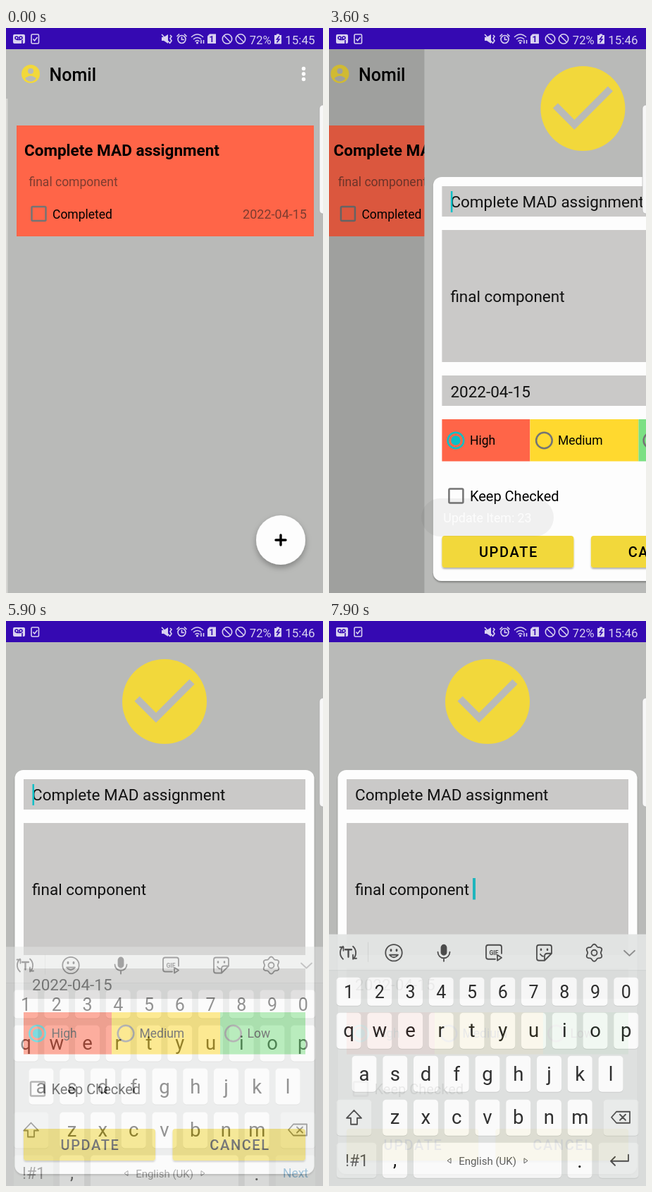
Write an HTML page that moves like this. It is 450 px wide and 800 px high and loops after 8 s.

```html
<!DOCTYPE html>
<html lang="en">
<head>
<meta charset="utf-8">
<title>To-do app</title>
<style>
  html, body { margin: 0; width: 100%; height: 100%; overflow: hidden; background: #b9bab8; }
  svg { display: block; width: 100%; height: 100%; font-family: Roboto, sans-serif; }
  .line { fill: none; stroke: #444; stroke-width: 1.8; stroke-linecap: round; stroke-linejoin: round; }
  .status { fill: none; stroke: #d9d2f0; stroke-width: 1.6; }
  .status .solid { fill: #d9d2f0; stroke: none; }
  .box { fill: none; stroke: #747474; stroke-width: 2.5; }
  .mid { text-anchor: middle; }
  .button { font-size: 20px; font-weight: 500; letter-spacing: 1.6px; text-anchor: middle; }
</style>
</head>
<body>
<svg viewBox="0 0 450 800">
  <defs>
    <filter id="shadow" x="-20%" y="-20%" width="140%" height="150%">
      <feDropShadow dx="0" dy="4" stdDeviation="4" flood-opacity=".3"/>
    </filter>
    <filter id="soft" x="-10%" y="-10%" width="120%" height="140%">
      <feDropShadow dx="0" dy="2" stdDeviation="1.3" flood-opacity=".3"/>
    </filter>
    <clipPath id="formClip"><rect id="formWindow" x="12" y="224" width="426"/></clipPath>
  </defs>

  <g id="home">
    <rect width="450" height="800" fill="#b9bab8"/>
    <rect y="100" width="2.5" height="700" fill="#d6d5d2"/>
    <circle cx="35" cy="65" r="13" fill="#f2d83b"/>
    <circle cx="35" cy="61" r="4" fill="#b9bab8"/>
    <path d="M27 71.500Q35 64 43 71.500Q35 80 27 71.500" fill="#b9bab8"/>
    <text x="61.500" y="74.500" font-size="25" font-weight="500">Nomil</text>
    <g fill="#fff"><circle cx="422.500" cy="57.500" r="2.700"/><circle cx="422.500" cy="65" r="2.700"/><circle cx="422.500" cy="72.500" r="2.700"/></g>
    <rect x="15" y="138" width="422" height="157" fill="#ff6548"/>
    <text x="26" y="181" font-size="22.500" font-weight="700">Complete MAD assignment</text>
    <g font-size="17.500">
      <text x="32.500" y="224" fill="#7e3c30">final component</text>
      <text x="66" y="269.500">Completed</text>
      <text x="427" y="269.500" font-size="18" text-anchor="end" fill="#7e3c30">2022-04-15</text>
    </g>
    <rect class="box" x="36.500" y="253" width="20" height="20" rx="1.500"/>
    <circle cx="390" cy="725" r="35" fill="#fdfdfd" filter="url(#shadow)"/>
    <path d="M390 718V732M383 725H397" stroke="#000" stroke-width="3.400" stroke-linecap="round"/>
    <rect id="dim" width="450" height="800"/>
  </g>

  <g id="edit">
    <rect width="450" height="800" fill="#b9bab8"/>
    <rect id="below" y="436" width="450" height="364" fill="#fbfbfb"/>
    <circle cx="225" cy="114" r="60" fill="#f2d83b"/>
    <path d="M186 110L213 137L264 86" fill="none" stroke="#b9bab8" stroke-width="10"/>
    <rect id="card" x="12.500" y="211" width="425" rx="12" fill="#fdfdfd" filter="url(#soft)"/>
    <g clip-path="url(#formClip)">
      <g id="form">
        <g fill="#cac9c8">
          <rect x="25" y="224" width="400" height="43"/>
          <rect x="25" y="286" width="400" height="187"/>
          <rect x="25" y="492" width="400" height="43"/>
        </g>
        <g font-size="22.500" fill="#111">
          <text x="37" y="254">Complete MAD assignment</text>
          <text x="37" y="388">final component</text>
          <text x="37" y="522.500">2022-04-15</text>
        </g>
        <rect id="titleCursor" x="37.500" y="231" width="2.500" height="30" fill="#0abfc6"/>
        <rect id="notesCursor" x="204" y="364" width="4" height="30.500" fill="#1fb5bd"/>
        <path id="handle" d="M205 394.500L213.300 402.700A11.700 11.700 0 1 1 196.700 402.700Z" fill="#0abfc6"/>
        <rect x="25" y="554" width="125" height="59.500" fill="#ff6548"/>
        <rect x="150" y="554" width="154" height="59.500" fill="#ffd92f"/>
        <rect x="304" y="554" width="121" height="59.500" fill="#7be083"/>
        <circle class="box" cx="44.500" cy="584" r="11.300" style="stroke:#0abfc6"/>
        <circle cx="44.500" cy="584" r="6.700" fill="#0abfc6"/>
        <circle class="box" cx="170" cy="584" r="11.300"/>
        <circle class="box" cx="322.500" cy="584" r="11.300"/>
        <g font-size="17.500"><text x="64.500" y="590">High</text><text x="189.500" y="590">Medium</text><text x="342.500" y="590">Low</text></g>
        <rect class="box" x="35" y="652.500" width="20" height="20" rx="1.500"/>
        <text x="64.500" y="670" font-size="20">Keep Checked</text>
        <g fill="#f2d83b" filter="url(#soft)"><rect x="25" y="719" width="187" height="45" rx="4"/><rect x="236.500" y="719" width="188.500" height="45" rx="4"/></g>
        <text class="button" x="119.500" y="749">UPDATE</text>
        <text class="button" x="332" y="749">CANCEL</text>
      </g>
    </g>
  </g>

  <g id="keyboard">
    <rect y="436" width="450" height="420" fill="#dcdedd"/>
    <rect y="436" width="450" height="51" fill="#e3e5e4"/>
    <path d="M0 487H450M55.500 447V475" stroke="#d0d2d1"/>
    <g id="keys"></g>
    <g class="line">
      <path d="M20 471A12 12 0 0 1 20 453M15.500 454H20.500V459M34 453A12 12 0 0 1 34 471M39 470H34V465"/>
      <path d="M23 457.500H32M27.500 457.500V468" stroke-width="2.300"/>
      <circle cx="92" cy="462" r="11.700"/><path d="M86 465Q92 472 98 465Z"/>
      <path d="M88 458V459M96 458V459" stroke-width="2.800"/>
      <rect x="159.500" y="451" width="7" height="14" rx="3.500" fill="#444"/><path d="M154.500 461A8.500 8.500 0 0 0 171.500 461M163 470V474"/>
      <path d="M236 471H226Q223 471 223 468V454Q223 451 226 451H242Q245 451 245 454V463M239 465L245 469L239 473Z"/>
      <path d="M306 473H298Q295 473 295 470V454Q295 451 298 451H313Q316 451 316 454V463L306 473V467Q306 463 310 463H316M300 464Q302 467 304 467"/>
      <path d="M301 457V458M310 457V458" stroke-width="2.500"/>
      <path id="gear"/><circle cx="376.500" cy="462" r="4"/>
      <path d="M419 459L426.500 466L434 459" stroke="#888"/>
      <path d="M35.500 685L46 696H40V705H31V696H25Z"/>
      <path d="M401 695L408 687H427V703H408ZM413 691L421 699M421 691L413 699"/>
      <path id="enter" d="M425 748V757H400M406 751L400 757L406 763"/>
    </g>
    <text class="mid" x="234" y="465" font-size="8.500" font-weight="700" fill="#444">GIF</text>
    <text class="mid" x="39.500" y="764" font-size="23" fill="#555">!#1</text>
    <text class="mid" x="225" y="762" font-size="15" fill="#555">English (UK)</text>
    <path d="M173 753V760L168 756.500ZM277 753V760L282 756.500Z" fill="none" stroke="#555"/>
    <text class="mid" id="next" x="411" y="762" font-size="17.500" fill="#3f86b4">Next</text>
  </g>

  <g id="toast">
    <rect x="131" y="666" width="188" height="54" rx="27" fill="#555" opacity=".9"/>
    <text class="mid" x="225" y="700" font-size="17.800" fill="#fafafa">Update Item: 23</text>
  </g>

  <rect x="445" y="109" width="12" height="154" rx="5" fill="#f7f7f7" stroke="#aaa" stroke-width=".6"/>
  <rect width="450" height="30" fill="#3509b2"/>
  <g class="status">
    <rect class="solid" x="10" y="9" width="17" height="13" rx="2"/>
    <g stroke="#3509b2"><circle cx="15" cy="14" r="2"/><circle cx="21" cy="14" r="2"/><path d="M15 16.500H21M23 17V22"/></g>
    <rect x="36" y="9" width="10.500" height="13" rx="1.500"/><path d="M38.500 15.500L40.500 18L44.500 13"/>
    <path class="solid" d="M221 13H224L230 9V22L224 18H221Z"/><path d="M221 9L233 22M233 10L235 12L233 15L235 18L233 21"/>
    <circle cx="249.500" cy="16" r="5.500"/><path d="M249.500 12.500V16.500H253M242.500 12L246 8.500M256.500 12L253 8.500"/>
    <path d="M263 13Q271.500 5 280 13M266 16Q271.500 11 277 16M268.500 19Q271.500 16 274.500 19M277 17V22M280.500 22V17"/><circle class="solid" cx="271.500" cy="21" r="1.600"/>
    <path class="solid" d="M289 8.500H298V22H286V11.500Z"/>
    <circle cx="314" cy="15.500" r="6.700"/><path d="M309.500 11L318.500 20"/>
    <circle cx="333" cy="15.500" r="6.700"/><path d="M328.500 11L337.500 20"/>
    <path class="solid" d="M384 8.500H388V10H391V22.500H381V10H384Z"/><path d="M388 11.500L384.500 16H388L384.500 20.500" stroke="#3509b2"/>
  </g>
  <g fill="#d9d2f0" font-size="17">
    <text x="292" y="20" class="mid" font-size="12" font-weight="700" style="fill:#3509b2">1</text>
    <text x="376.500" y="22.500" font-size="16.500" text-anchor="end">72%</text>
    <text id="clock" x="438.500" y="22.500" text-anchor="end"></text>
  </g>
</svg>
<script>
const LOOP = 8000;
const el = Object.fromEntries([...document.querySelectorAll('[id]')].map(n => [n.id, n]));
const progress = (t, start, length) => Math.min(1, Math.max(0, (t - start) / length));
const easeOut = p => 1 - (1 - p) ** 2;
const smooth = p => p * p * (3 - 2 * p);
const set = (id, attrs) => { for (const name in attrs) el[id].setAttribute(name, attrs[name]); };
const show = (id, visible) => set(id, { opacity: +visible });
const move = (id, x, y) => set(id, { transform: `translate(${x} ${y})` });

// Cubic bezier easing through (.33, 0) and (.2, 1): quick start, long tail.
function easeSlide(p) {
  let low = 0, high = 1;
  for (let i = 0; i < 24; i++) {
    const s = (low + high) / 2;
    const x = 3 * (1 - s) ** 2 * s * 0.33 + 3 * (1 - s) * s * s * 0.2 + s ** 3;
    if (x < p) low = s; else high = s;
  }
  return smooth(high);
}

const key = (x, y, w, h, fill = '#fafafa') =>
  `<rect x="${x}" y="${y + 1}" width="${w}" height="${h}" rx="5" fill="#c9cbca"/>` +
  `<rect x="${x}" y="${y}" width="${w}" height="${h}" rx="5" fill="${fill}"/>`;

// characters, first key centre, top, height, baseline, font size
const rows = [
  ['1234567890', 28, 497, 40, 526, 25],
  ['qwertyuiop', 28, 547, 51, 581, 27.5],
  ['asdfghjkl', 50, 608, 51, 643, 27.5],
  ['zxcvbnm', 93.7, 670, 51, 704, 27.5],
];
const letterKeys = rows.map(([chars, first, top, height, baseline, size]) =>
  [...chars].map((char, i) => {
    const x = first + i * 43.75;
    return key(x - 17.5, top, 35, height) +
      `<text class="mid" x="${x}" y="${baseline}" font-size="${size}" fill="#222">${char}</text>`;
  }).join('')).join('');
const gray = '#e8eae9';
el.keys.innerHTML = letterKeys +
  key(10.5, 670, 50, 51, gray) + key(389.5, 670, 50, 51, gray) +
  key(10.5, 731, 57, 50, gray) + key(76, 731, 35, 50) + key(120, 731, 210, 50) +
  key(338.5, 731, 35, 50) + key(382.5, 731, 57, 50, gray) +
  '<text class="mid" x="93.5" y="764" font-size="26">,</text>' +
  '<text class="mid" x="356" y="766" font-size="28">.</text>';

const gearPoints = Array.from({ length: 49 }, (_, i) => {
  const a = i / 48 * 2 * Math.PI, r = 10.7 + 1.4 * Math.cos(6 * a);
  return `${376.5 + r * Math.sin(a)} ${462 + r * Math.cos(a)}`;
});
set('gear', { d: 'M' + gearPoints.join('L') });

function keyboardLevel(t) {
  if (t < 5800) return easeOut(progress(t, 3690, 245));
  if (t < 7800) return 1 - easeOut(progress(t, 5820, 270));
  return easeOut(progress(t, 7801, 165));
}

function draw(t) {
  el.clock.textContent = t < 100 ? '15:45' : '15:46';

  const slide = easeSlide(progress(t, 3380, 515));
  move('home', -28 * slide, 0);
  show('home', slide < 1);
  set('dim', { opacity: 0.2 * slide });
  move('edit', 450 * (1 - slide), 0);

  // While the keyboard is up the card is short and its form overflows, centred.
  const compact = t >= 3690 && t < 5850;
  set('card', { height: compact ? 225 : 572 });
  set('formWindow', { height: compact ? 200 : 547 });
  move('form', 0, compact ? -173.5 : 0);
  show('below', compact);

  const editingNotes = t >= 6600;
  show('titleCursor', t < 6100);
  show('notesCursor', editingNotes && (t < 7100 || t >= 7600));
  show('handle', editingNotes && t < 7850);

  const level = keyboardLevel(t);
  move('keyboard', 0, 50 * (1 - level));
  set('keyboard', { opacity: smooth(level) });
  show('next', !editingNotes);
  show('enter', editingNotes);

  set('toast', { opacity: progress(t, 3580, 250) * (1 - progress(t, 5400, 300)) });
}

function tick() {
  draw(performance.now() % LOOP);
  requestAnimationFrame(tick);
}
tick();
</script>
</body>
</html>
```
